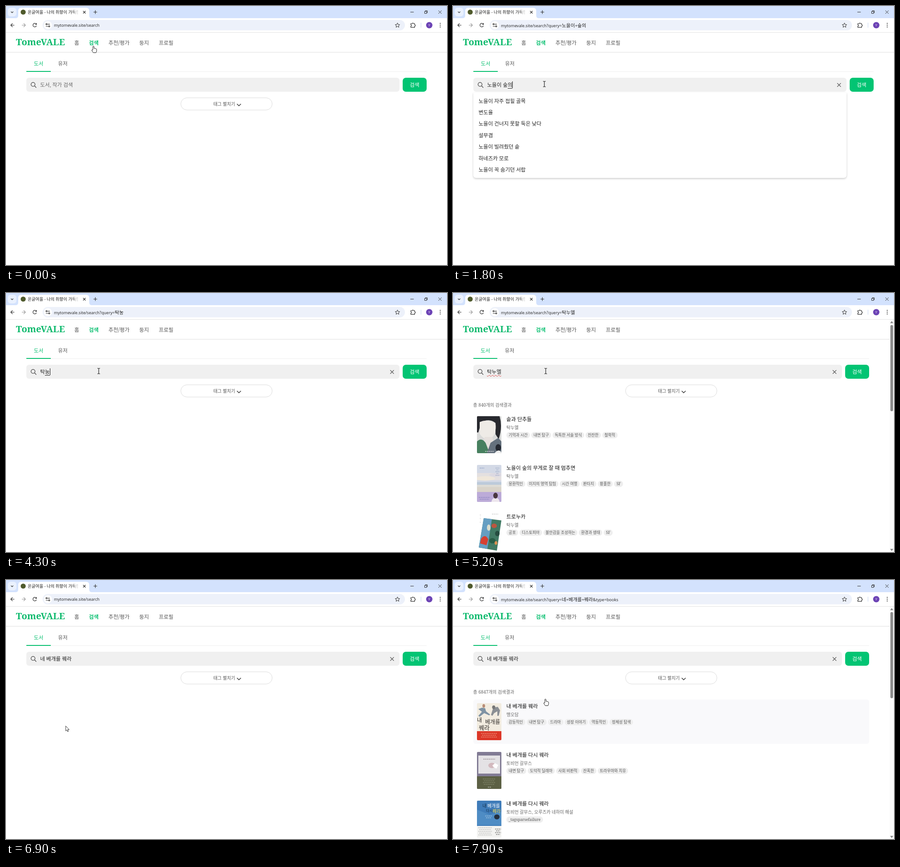
An HTML page that plays this animation: 975 by 574 pixels, repeating every 8000 ms.

```html
<!DOCTYPE html>
<html lang="ko">
<head>
<meta charset="utf-8">
<title>Book search</title>
<style>
html, body { margin: 0; width: 100%; height: 100%; overflow: hidden; background: #fff; }
body { position: relative; font: 11.5px/16px "Noto Serif", "Noto Sans CJK KR", serif; color: #222; }
#stage { position: absolute; left: 0; top: 0; width: 975px; height: 574px; overflow: hidden; background: #fff; }
#stage div, #stage svg { position: absolute; box-sizing: border-box; white-space: pre; }
#chrome { left: 0; top: 0; width: 975px; height: 59px; }
.ui { font: 9.1px/16px "Open Sans", "Noto Sans CJK KR", sans-serif; color: #222; }
.ui b { font-size: 10.6px; font-weight: 400; }
#tab { left: 48px; top: 5.5px; width: 113px; overflow: hidden; font-size: 9.3px;
  mask-image: linear-gradient(90deg, #000 88%, transparent); }
#url { left: 106px; top: 34.5px; }
#page { left: 0; top: 59px; width: 975px; height: 515px; }
.scroll #page { width: 965px; }
#head { left: 0; right: 0; top: 0; height: 44px; border-bottom: 1px solid #dedede; }
#logo { left: 22px; top: 7px; font-size: 20px; line-height: 28px; font-weight: 600; color: #0cb96c; }
#nav { left: 151px; top: 13.5px; display: flex; gap: 21.5px; color: #555; font-size: 11.75px; }
#nav b, #on { color: #08bf70; }
#main { left: 45px; right: 45px; top: 0; height: 515px; }
.scroll #main { left: 44.5px; }
#line { left: 0; right: 0; top: 86px; height: 1px; background: #efefef; }
#on { left: 0; top: 61px; width: 53.5px; height: 25.5px; padding-left: 16.5px; border-bottom: 2px solid #08bf70; }
#user { left: 70px; top: 61px; color: #555; }
#box { left: 0; right: 60px; top: 100px; height: 31px; border-radius: 6px; background: #f0f0f0; }
#text { left: 30.5px; top: 7.5px; }
#text u { text-decoration: none; border-bottom: 1px solid #222; }
#text s { text-decoration: underline wavy #d43b3b 1px; text-underline-offset: 2px; }
#text i { border-left: 1px solid #111; margin-right: -1px; }
#text em { font-style: normal; color: #666; }
#clear { right: 12px; top: 10.5px; }
#go { right: 0; top: 100px; width: 53.5px; height: 31px; line-height: 31px; border-radius: 7px;
  background: #02c473; color: #fff; text-align: center; }
#tags { left: 50%; top: 144px; width: 203px; height: 28px; margin-left: -101.5px; padding-left: 71.5px;
  border: 1px solid #dcdcdc; border-radius: 14px; font-size: 9.9px; line-height: 26px; color: #555; }
#tags svg { left: 123px; top: 11.5px; }
#drop { left: 0; right: 60px; top: 133px; height: 189px; padding: 5.8px 11.5px; line-height: 25.35px;
  background: #fff; border-radius: 0 0 6px 6px; box-shadow: 0 2px 4px #0003; }
.list { left: 0; right: 0; top: 0; height: 515px; }
.count { left: 0; top: 180.5px; font-size: 9.9px; color: #666; }
.item { left: 0; right: 0; height: 97.5px; border-radius: 5px; }
.item.hover { background: #f9f9fb; }
.item svg { left: 8px; top: 8px; border-radius: 2px; }
.name { left: 73.5px; top: 7px; font-weight: 500; color: #111; }
.by { left: 73.5px; top: 25.5px; font-size: 9.8px; color: #666; }
.pills { left: 73.5px; top: 43px; display: flex; gap: 3px; }
.pills span { padding: 0 5px; border-radius: 7px; background: #eee; font-size: 8.65px; line-height: 14px; color: #555; }
#bar { right: 0; top: 59px; width: 10px; height: 515px; background: #fbfbfb; }
</style>
</head>
<body>
<div id="stage">
  <svg id="chrome" viewBox="0 0 975 59" fill="none" stroke="#333" stroke-width="1.2">
    <g stroke="none">
      <path fill="#d3e2fd" d="M0 0H975V27H0Z"/>
      <rect x="4" y="4" width="19" height="19" rx="6" fill="#eaf1fe"/>
      <path fill="#fff" d="M21 27Q27 27 27 21V11Q27 4 34 4H177Q184 4 184 11V21Q184 27 190 27Z"/>
      <circle cx="38" cy="13.5" r="5.6" fill="#4f5a2c"/>
      <path fill="#e3e3e3" d="M0 58H975V59H0Z"/>
      <rect x="81" y="31" width="801" height="23" rx="11.5" fill="#edf1fa"/>
      <circle cx="92.5" cy="42.5" r="9" fill="#fff"/>
      <circle cx="935.8" cy="42.5" r="7" fill="#6c43b5"/>
      <path fill="#c9d8f2" d="M917 37H918V48H917Z"/>
      <g fill="#333"><circle cx="960" cy="38.5" r="1.1"/><circle cx="960" cy="42.5" r="1.1"/><circle cx="960" cy="46.5" r="1.1"/></g>
      <text x="935.8" y="45" fill="#fff" font-size="7" text-anchor="middle" font-family="Open Sans, sans-serif">Y</text>
    </g>
    <path d="M11 12.5L13.5 15L16 12.5M170.5 11L176 16.5M176 11L170.5 16.5M197.5 9.5V17.5M193.5 13.5H201.5"/>
    <path d="M18.5 42.5H10.5M14.5 38.5L10.5 42.5L14.5 46.5M67 40.3A4 4 0 1 0 67.3 43.8M67.4 38V41H64.4"/>
    <path stroke="#999" d="M35 42.5H43M39 38.5L43 42.5L39 46.5"/>
    <path d="M91.5 40.3H97M88 45H93.5"/><circle cx="89.5" cy="40.3" r="1.4"/><circle cx="95.5" cy="45" r="1.4"/>
    <path stroke-width="1" d="M865.5 37.5L867 41L870.6 41.3L867.8 43.6L868.7 47.2L865.5 45.2L862.3 47.2L863.2 43.6L860.4 41.3L864 41Z"/>
    <path d="M895 39H898A1.6 1.6 0 0 1 901 39H903.5V41.5A1.6 1.6 0 0 1 903.5 44.7V47.3H895V44.7A1.6 1.6 0 0 0 895 41.5Z"/>
    <path stroke-width="1" d="M894 13.5H901.5M925.5 12H930V16.5H925.5ZM927 12V10.5H931.5V15H930M956 10L963 17M963 10L956 17"/>
  </svg>
  <div id="tab" class="ui">온글여울 - 나의 취향이 가득한 곳</div>
  <div id="url" class="ui"></div>
  <div id="page">
    <div id="head">
      <div id="logo">TomeVALE</div>
      <div id="nav"><span>홈</span><b>검색</b><span>추천/평가</span><span>둥지</span><span>프로필</span></div>
    </div>
    <div id="main">
      <div id="line"></div><div id="on">도서</div><div id="user">유저</div>
      <div id="box">
        <svg style="left:9px;top:9px" width="14" height="14" fill="none" stroke="#444" stroke-width="1.3"><circle cx="5.8" cy="5.8" r="4.4"/><path d="M9 9L13 13"/></svg>
        <div id="text"></div>
        <svg id="clear" width="9" height="10" stroke="#555" stroke-width="1.1"><path d="M.5 1L8.5 9M8.5 1L.5 9"/></svg>
      </div>
      <div id="go">검색</div>
      <div id="tags">태그 펼치기<svg width="10" height="7" fill="none" stroke="#333" stroke-width="1.4"><path d="M.7 1L5 5.2L9.3 1"/></svg></div>
      <div id="drop">노을이 자주 접힐 골목
변도율
노을이 건너지 못할 둑은 낮다
설무겸
노을이 빌려줬던 솥
하네즈카 모로
노을이 꼭 숨기던 서랍</div>
    </div>
  </div>
  <svg id="bar" viewBox="0 0 10 515" fill="#8a8a8a"><rect x="2" y="12" width="6" height="191" rx="3"/><path d="M1.5 8L5 3L8.5 8ZM1.5 508H8.5L5 513Z"/></svg>
  <svg id="cursor" width="20" height="20" style="overflow:visible" fill="#fff" stroke="#222">
    <path id="hand" d="M-3 -6.5Q-1.6 -8 -.4 -6.5V-2Q1 -3 2 -1.6Q3.4 -2.4 4 -.9Q5.4 -1.2 5.4 .6V3.5L4 7.5H-2L-5.5 2.2Q-5.6 .4 -3 1.5Z"/>
    <path id="beam" fill="none" stroke-width="1.2" d="M-3 -6H-1L0 -5.2L1 -6H3M0 -5.2V5.2M-3 6H-1L0 5.2L1 6H3"/>
    <path id="arrow" stroke-width=".9" d="M-3 -6.5V4.5L-.5 2.3L1.2 6.2L3 5.4L1.3 1.7H4.8Z"/>
  </svg>
</div>
<script>
const $ = id => document.getElementById(id);
const path = (d, fill) => `<path d="${d}" fill="${fill}"/>`;
const rect = (x, y, w, h, fill) => path(`M${x} ${y}h${w}v${h}h${-w}z`, fill);
const dot = (x, y, rx, ry, fill) => `<ellipse cx="${x}" cy="${y}" rx="${rx}" ry="${ry}" fill="${fill}"/>`;
const word = (s, x, y, size, fill) =>
  `<text x="${x}" y="${y}" font-size="${size}" fill="${fill}" font-weight="500">${s}</text>`;
// rows of dashes standing for fine print
const print = (x, y, w, n, fill) =>
  `<path d="${Array.from({ length: n }, (_, i) => `M${x + i % 2 * 2} ${y + i * 4}h${w - i % 2 * 4}`).join('')}"
    stroke="${fill}" stroke-dasharray="3 1"/>`;

const covers = {
  sky: rect(0, 0, 54, 82, '#d3d9e6') + rect(0, 18, 54, 16, '#e4e0e0') + dot(18, 30, 22, 5, '#efe7da') +
    dot(42, 22, 15, 4, '#dcd9e2') + rect(0, 38, 54, 6, '#bccada') + rect(0, 44, 54, 5, '#dddcd6') +
    rect(0, 49, 54, 12, '#d9d3c9') + rect(0, 60, 54, 22, '#bcabd8') + print(6, 7, 10, 1, '#7f91bd') +
    print(41, 7, 9, 5, '#8e9dbd') + print(4, 72, 25, 2, '#7a78b8') +
    path('M32 82Q33 73 41 73Q49 73 50 82Z', '#eee7ee') + dot(41, 68, 5, 6.5, '#4a3840'),
  heads: rect(0, 0, 54, 82, '#56306f') + path('M0 0H23Q26 18 15 25L0 29Z', '#bd8e55') + dot(18, 11, 8, 11, '#f0e7df') +
    path('M0 30Q16 24 19 44L14 59H0Z', '#d19b42') + dot(42, 12, 12, 14, '#e7d7c9') + path('M36 0H54V32Q42 29 41 15Z', '#683b7c') +
    path('M25 39Q42 28 54 43V75H28Z', '#a94926') + dot(27, 51, 9, 12, '#f1e4d7') + path('M0 67Q8 49 23 60Q38 75 54 63V82H0Z', '#16867d') +
    dot(12, 70, 9, 10, '#d5a155') + rect(19, 29, 24, 11, '#56306f') + print(21, 32, 21, 2, '#fff'),
  portrait: rect(0, 0, 54, 82, '#d9dad9') + path('M0 0H50Q57 24 48 51L41 40V15Q28 4 10 13L3 36H0Z', '#28292e') +
    path('M6 13Q23 5 41 16Q44 40 30 50Q15 54 6 39Z', '#eeebe6') + path('M17 46H34L43 82H9Z', '#e6e1dd') +
    path('M0 56Q10 46 19 59L28 82H0Z', '#47805f') + path('M30 59L47 48L54 56V82H22Z', '#65717d') +
    dot(47, 70, 6, 8, '#242830') + path('M39 82Q47 71 54 80V82Z', '#eee') + print(18, 78, 19, 1, '#fff'),
  tilt: rect(0, 0, 54, 82, '#fff') + path('M15 10L54 15L44 82L4 75Z', '#417a64') + path('M15 10L33 12L23 78L4 75Z', '#659ec2') +
    path('M9 56Q18 43 25 57L21 70L7 66Z', '#d64031') + dot(38, 27, 6, 5, '#bb5640') + dot(45, 44, 5, 6, '#264d40') +
    dot(34, 60, 7, 6, '#285e46') + dot(42, 65, 3, 4, '#da9050') + dot(26, 31, 4, 7, '#d8dccc') + print(33, 1, 14, 1, '#bbb') + print(6, 3, 3, 5, '#ccc'),
  runner: rect(0, 0, 54, 82, '#f2ece0') + dot(15, 6, 3, 4, '#b98e78') +
    path('M11 10L18 11L20 18L29 25L27 27L16 22L6 30L3 28L11 19L3 13Z', '#7f93a4') +
    path('M36 10L46 8L51 16L48 28H45L45 18L38 22L34 28L31 26Z', '#8b8f94') + dot(37, 9, 3.5, 4, '#777') +
    word('내', 0, 42, 12, '#302c29') + word('베개를', 18, 46, 12, '#302c29') +
    word('꿰라', 4, 59, 13, '#302c29') +
    rect(0, 62, 54, 20, '#dc3728') + print(9, 67, 36, 3, '#f3b59b'),
  bird: rect(0, 0, 54, 82, '#817b94') + rect(3, 8, 48, 40, '#e4e2e5') + rect(0, 54, 54, 28, '#5c6044') +
    print(14, 16, 26, 1, '#766a70') + dot(33, 30, 8, 6, '#d3b9be') + path('M34 30L40 25L47 29L43 37L37 34Z', '#fff') +
    print(13, 60, 28, 4, '#90947b') + print(24, 78, 8, 1, '#ddd'),
  blue: rect(0, 0, 54, 56, '#3f7cb9') + rect(0, 56, 54, 26, '#f3f3f1') + path('M0 20L28 31L54 25V54H0Z', '#4e8cc4') +
    word('내', 12, 15, 10, '#17324d') + word('베개를', 23, 15, 10, '#fff') + word('다시', 20, 25, 8, '#17324d') +
    word('꿰라', 34, 27, 10, '#f0d74d') + dot(44, 36, 6, 5.5, '#232f3e') + print(18, 34, 16, 2, '#bad2e7') +
    print(3, 60, 30, 5, '#aaa') + print(40, 63, 13, 4, '#444')
};

const light = ['노을이 숲의 무게로 잘 때 멈추면', '탁누엘', '몽환적인,미지의 영역 탐험,시간 여행,판타지,황홀한,SF', 'sky'];
const results = [
  ['10000', light,
    ['노을이 숲의 무게로 잘 때 멈추면 (큰글자도서)', '탁누엘', '기억과 시간,긴장감 있는,내면 탐구,우울한,우정과 동료애,철학적,SF', 'sky'],
    ['노을 골목의 가로등지기', '들샘일지 노을골목의가로등지기팀', '문화 충돌,불평등,사회 비판적,이민과 정체성,정체성 탐색', 'heads']],
  ['840', ['솥과 단추들', '탁누엘', '기억과 시간,내면 탐구,독특한 서술 방식,잔잔한,철학적', 'portrait'], light,
    ['트로누카', '탁누엘', '공포,디스토피아,불안감을 조성하는,환경과 생태,SF', 'tilt']],
  ['6847', ['내 베개를 꿰라', '맹오담', '감동적인,내면 탐구,드라마,성장 이야기,역동적인,정체성 탐색', 'runner'],
    ['내 베개를 다시 꿰라', '토비언 갈무스', '내면 탐구,도덕적 딜레마,사회 비판적,잔혹한,트라우마와 치유', 'bird'],
    ['내 베개를 다시 꿰라', '토비언 갈무스, 오루즈카 네하미 해설', '_tagsparsefailure', 'blue']]
];
const lists = results.map(([count, ...books]) => {
  const list = document.createElement('div');
  list.className = 'list';
  list.innerHTML = `<div class="count">총 ${count}개의 검색결과</div>` + books.map(([name, by, tags, cover], i) =>
    `<div class="item" style="top:${206 + 108 * i}px"><svg width="54" height="82">${covers[cover]}</svg>
    <div class="name">${name}</div><div class="by">${by}</div>
    <div class="pills">${tags.split(',').map(s => `<span>${s}</span>`).join('')}</div></div>`).join('');
  $('main').append(list);
  return list;
});

// each search: typing start, ms per key, results shown, cleared, stages of the typed text
const searches = [
  [700, 78, 2300, 3550, 'ㄴ|노|농|노으|노을|노을ㅇ|노을이|노을이 |노을이 ㅅ|노을이 수|노을이 숲|노을이 숲ㅇ|노을이 숲으|노을이 숲의'],
  [3750, 100, 4750, 5600, 'ㅌ|타|탁|탁ㄴ|탁누|탁눙|탁누에|탁누엘'],
  [5750, 60, 7200, 8000, 'ㄴ|네|네 |네 ㅂ|네 베|네 벡|네 베개|네 베갤|네 베개르|네 베개를|네 베개를 |네 베개를 ㄲ|네 베개를 꾸|네 베개를 꿰|네 베개를 꿸|네 베개를 꿰라']
].map(([start, step, shown, end, keys]) => ({ start, step, shown, end, keys: keys.split('|') }));

const moves = [[0, 195, 96], [100, 195, 96], [400, 202, 173], [1900, 202, 173], [2300, 205, 173],
  [6300, 205, 173], [6750, 135, 330], [7250, 135, 330], [7700, 206, 271], [8000, 206, 271]];

function pointer(t) {
  const i = moves.findIndex(m => m[0] > t), [t0, x0, y0] = moves[i - 1], [t1, x1, y1] = moves[i];
  const p = (t - t0) / (t1 - t0), e = p * p * (3 - 2 * p);
  return [x0 + (x1 - x0) * e, y0 + (y1 - y0) * e];
}
const show = (el, on) => { el.style.display = on ? '' : 'none'; };
const put = (el, html) => { if (el.last !== html) el.innerHTML = el.last = html; };

function draw(t) {
  const n = searches.findIndex(s => t >= s.start && t < s.end), s = searches[n];
  const key = s ? Math.min(s.keys.length - 1, Math.floor((t - s.start) / s.step)) : 0;
  const typed = s ? s.keys[key] : '';
  const done = !!s && t >= s.shown;
  const idle = s ? t - s.start - s.step * (s.keys.length - 1) : 0;
  const focused = t > 420 && t < 6700;
  const caret = focused && (idle < 0 || idle % 1060 < 530) ? '<i></i>' : '';

  let text = typed;
  if (!s) text = caret + '<em>도서, 작가 검색</em>';
  else if (done) text = (n === 1 ? `<s>${typed}</s>` : typed) + caret;
  else if (focused && !typed.endsWith(' ')) text = `${typed.slice(0, -1)}<u>${typed.slice(-1)}</u>${caret}`;
  else text += caret;
  put($('text'), text);

  let url = 'mytomevale.site/search';
  if (s && (n < 2 || done)) url += '?query=' + typed.replace(/ /g, '+') + (n === 2 ? '&amp;type=books' : '');
  put($('url'), url.replace(/[ㄱ-힣]+/g, '<b>$&</b>'));

  const [x, y] = pointer(t);
  const row = done ? Math.floor((y - 264) / 108) : -1;
  $('stage').className = done ? 'scroll' : '';
  show($('bar'), done);
  show($('clear'), s);
  show($('drop'), t >= 1250 && t < 1950);
  show($('tags'), t < 1250 || t >= 1950);
  lists.forEach((list, i) => {
    show(list, done && i === n);
    list.querySelectorAll('.item').forEach((item, j) => item.classList.toggle('hover', j === row));
  });

  const kind = y < 103 || row >= 0 ? 'hand' : y > 158 && y < 191 ? 'beam' : 'arrow';
  for (const id of ['hand', 'beam', 'arrow']) show($(id), id === kind);
  $('cursor').style.transform = `translate(${x}px, ${y}px)`;
}

const begin = performance.now();
(function loop() {
  draw((performance.now() - begin) % 8000);
  requestAnimationFrame(loop);
})();
</script>
</body>
</html>
```
